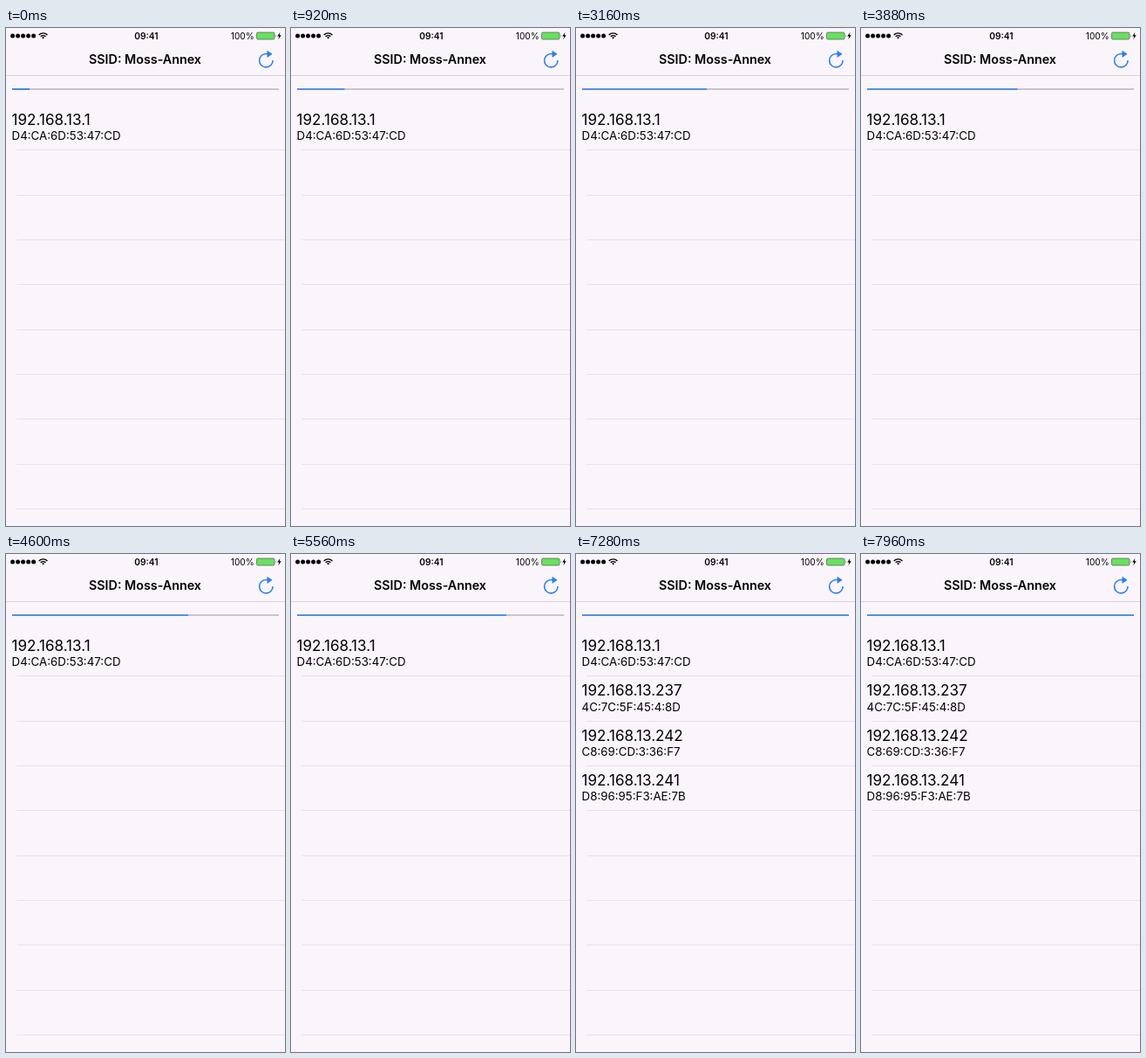
These frames come from a looping animation (320x570 px, 8000 ms). An HTML page:

```html
<!DOCTYPE html>
<html lang="en">
<head>
<meta charset="utf-8">
<title>Network scan</title>
<style>
  html, body { margin: 0; width: 100%; height: 100%; overflow: hidden; background: #faf5fb; }
  svg { display: block; width: 100vw; height: 100vh; font-family: Inter, "Liberation Sans", sans-serif; }
  .status { font-size: 10.2px; }
  .title { font-size: 14.3px; font-weight: 600; }
  .ip { font-size: 17.07px; }
  .mac { font-size: 13.3px; }
</style>
</head>
<body>
<svg viewBox="0 0 320 570">
  <rect width="320" height="570" fill="#faf5fb"/>
  <g id="signal"></g>
  <g fill="none" stroke="#000" stroke-width="1.4">
    <path d="M37.7 7.9a7 7 0 0 1 9.8 0M39.7 9.8a4.2 4.2 0 0 1 5.8 0"/>
    <path d="M41 10.7L42.6 12.4L44.2 10.7Q42.6 9.8 41 10.7Z" fill="#000" stroke="none"/>
  </g>
  <text class="status" x="161" y="12.6" text-anchor="middle" font-weight="600">09:41</text>
  <text class="status" x="284.8" y="12.6" text-anchor="end">100%</text>
  <rect x="287.5" y="5" width="20.5" height="8" rx="1.4" fill="#68e05f" stroke="#555" stroke-width=".7"/>
  <path d="M309 7.4q1.3 1.6 0 3.2z" fill="#555"/>
  <path d="M314.4 5L311.2 9.6H313.2L312.4 13L315.7 8.3H313.7Z"/>

  <text class="title" x="159.5" y="41" text-anchor="middle">SSID: Moss-Annex</text>
  <g stroke="#2f80e6" fill="none" stroke-width="1.6">
    <path d="M306 37A7.7 7.7 0 1 1 298.3 29.5H300.5"/>
    <path d="M299.8 26.2L305.2 29.8L299.8 33.4Z" fill="#2f80e6" stroke-width=".6"/>
  </g>
  <path d="M0 54.5H320" stroke="#d5d2d8" stroke-width="1"/>
  <path d="M7 70H313" stroke="#b7b5b9" stroke-width="1.7"/>
  <path id="progress" stroke="#2f80e6" stroke-width="1.7"/>
  <g id="separators" stroke="#e5e2e8"></g>
  <g id="hosts"></g>
</svg>
<script>
const LOOP = 8000, ROW = 51.3;
const byId = id => document.getElementById(id);

function add(parent, tag, attrs, text = '') {
  const el = document.createElementNS('http://www.w3.org/2000/svg', tag);
  for (const key in attrs) el.setAttribute(key, attrs[key]);
  el.textContent = text;
  return parent.appendChild(el);
}

for (let i = 0; i < 5; i++) add(byId('signal'), 'circle', { cx: 7.6 + i * 6, cy: 9, r: 2.5 });

// separators sit on whole pixel rows
for (let i = 0; i < 9; i++) {
  add(byId('separators'), 'path', { d: `M12.5 ${Math.floor(139.9 + i * ROW) + 0.5}H320` });
}

// address, hardware address, time of discovery
const hosts = [
  ['192.168.13.1', 'D4:CA:6D:53:47:CD', 0],
  ['192.168.13.237', '4C:7C:5F:45:4:8D', 6680],
  ['192.168.13.242', 'C8:69:CD:3:36:F7', 6960],
  ['192.168.13.241', 'D8:96:95:F3:AE:7B', 7000]
].map(([ip, mac, start], i) => {
  const row = add(byId('hosts'), 'g', { transform: `translate(0 ${i * ROW})` });
  add(row, 'text', { class: 'ip', x: 6.6, y: 111 }, ip);
  add(row, 'text', { class: 'mac', x: 6.6, y: 128.4 }, mac);
  return { row, start };
});

// time, right end of the progress bar
const progress = [[0, 27], [920, 61.5], [3160, 150], [4600, 209], [5560, 247], [6840, 299], [7200, 313], [LOOP, 313]];

function progressAt(t) {
  const i = progress.findIndex(([time]) => time > t);
  const [t0, x0] = progress[i - 1], [t1, x1] = progress[i];
  return x0 + (x1 - x0) * (t - t0) / (t1 - t0);
}

function draw(now) {
  const t = now % LOOP;
  byId('progress').setAttribute('d', `M7 70H${progressAt(t)}`);
  for (const { row, start } of hosts) row.style.display = t >= start ? '' : 'none';
  requestAnimationFrame(() => draw(performance.now()));
}
draw(0);
</script>
</body>
</html>
```
